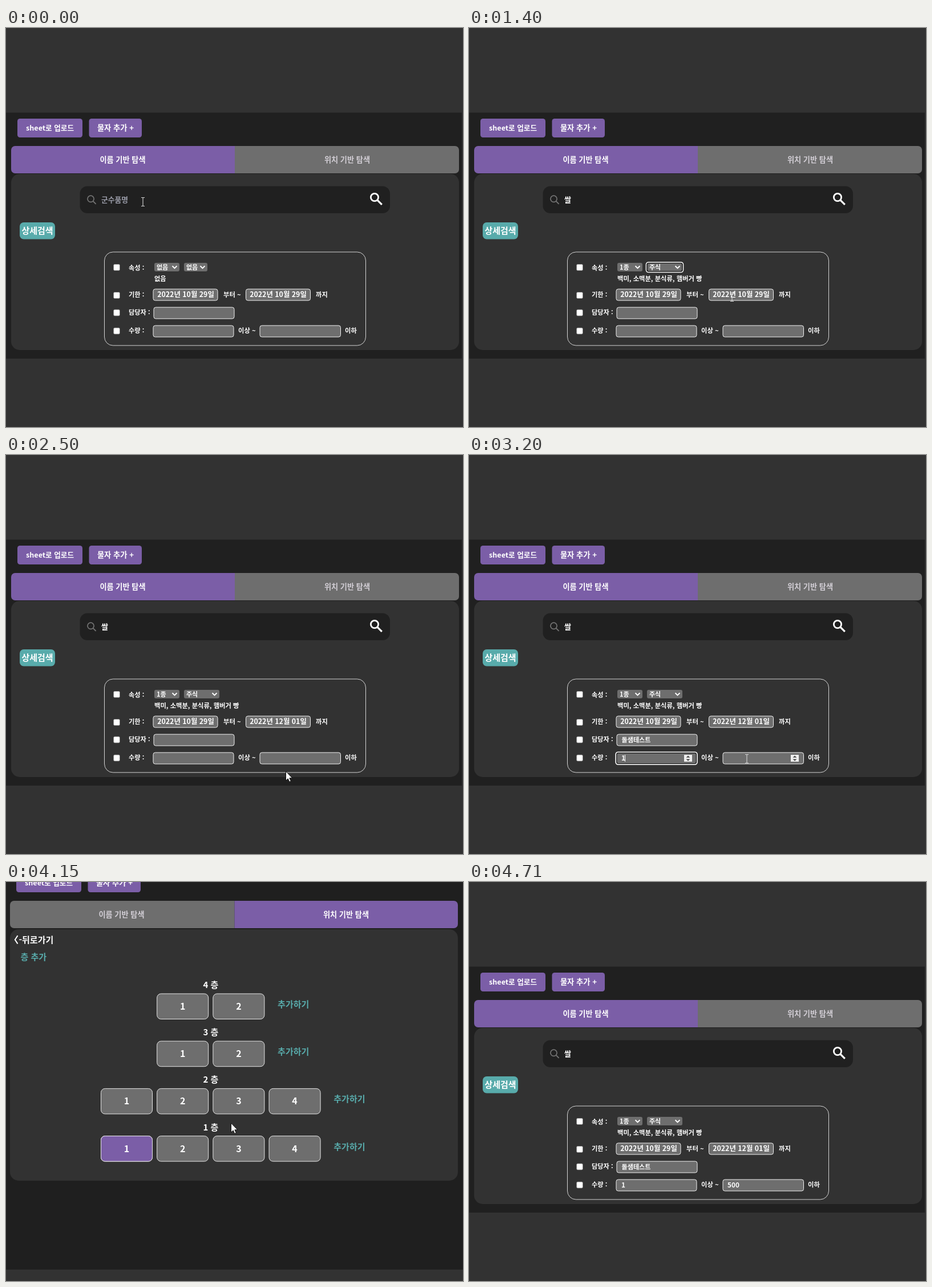
An HTML page that plays this animation: 801x700 px, repeating every 4.81 s.

```html
<!DOCTYPE html>
<html lang="ko">
<head>
<meta charset="utf-8">
<title>물자 탐색</title>
<style>
  html, body { margin: 0; width: 100%; height: 100%; overflow: hidden; background: #323232; }
  svg { display: block; width: 801px; height: 700px; }
  text { font-family: "Noto Sans CJK KR", "Noto Sans CJK", "Noto Sans", sans-serif; font-weight: 700; white-space: pre; }
</style>
</head>
<body>
<svg id="stage" viewBox="0 0 801 700"></svg>
<script>
const LOOP = 4810, MAP = 3700, LEVELS = 3900, BACK = 4710;
const PURPLE = '#7b5ea7', GRAY = '#6e6e6e', DARK = '#202020', PANEL = '#323232', TEAL = '#58abab', WHITE = '#fff';
const stage = document.getElementById('stage');
const timed = [];
let layer = stage;

function add(tag, attrs) {
  const el = document.createElementNS('http://www.w3.org/2000/svg', tag);
  for (const k in attrs) el.setAttribute(k, attrs[k]);
  layer.append(el);
  return el;
}

// Edges, not sizes: left, top, right, bottom.
const box = (l, t, r, b, fill, rx = 0, stroke = 'none', width = 1) =>
  add('rect', { x: l, y: t, width: r - l, height: b - t, rx, fill, stroke, 'stroke-width': width });

const line = (d, stroke = WHITE, width = 1.6) =>
  add('path', { d, stroke, fill: 'none', 'stroke-width': width });

function label(str, x, y, size, fill = WHITE, anchor = 'start') {
  const el = add('text', { x, y, fill, 'font-size': size, 'text-anchor': anchor });
  el.textContent = str;
  return el;
}
const centered = (str, x, y, size, fill) => label(str, x, y, size, fill, 'middle');

function group(draw) {
  const outer = layer;
  const g = layer = add('g', {});
  draw();
  layer = outer;
  return g;
}

// Draws a group visible in each [from, to) span.
function during(spans, draw) {
  timed.push({ el: group(draw), spans });
}

const chevron = (x, y) => line(`M${x - 4} ${y - 2}l4 4 4-4`, WHITE, 1.8);

function header(active) {
  box(20, 159, 134, 192, PURPLE, 4.5);
  centered('sheet로 업로드', 77, 180, 12.6);
  box(145.5, 159, 238, 192, PURPLE, 4.5);
  centered('물자 추가 +', 192, 180, 13.3);
  const split = active ? 402.5 : 401;
  const half = (l, r, on) =>
    add('path', {
      d: l < 10 ? `M${r} 207H16a7 7 0 0 0-7 7v34a7 7 0 0 0 7 7H${r}z`
                : `M${l} 207H787a7 7 0 0 1 7 7v34a7 7 0 0 1-7 7H${l}z`,
      fill: on ? PURPLE : GRAY
    });
  half(9, split, !active);
  half(split, 794, active);
  centered('이름 기반 탐색', 204.5, 235.5, 13.2, active ? '#d2ced5' : WHITE);
  centered('위치 기반 탐색', 598, 235.5, 13.2, active ? WHITE : '#d2ced5');
}

function select(str, l, r) {
  box(l, 412, r, 427, GRAY, 3);
  label(str, l + 4, 424, 11);
  chevron(r - 8.5, 419.5);
}

const field = (l, t, r, b) => box(l + .5, t + .5, r - .5, b - .5, GRAY, 3.5, '#f2f2f2');

function ring(l, t, r, b) {
  box(l, t, r, b, 'none', 4, WHITE, 1.6);
  box(l + 1.5, t + 1.5, r - 1.5, b - 1.5, 'none', 3, '#111', 1.2);
}

function spinner(x) {
  box(x, 526, x + 14, 538, '#efefef');
  add('path', { d: `M${x + 3.5} 530.8l3.5-3.3 3.5 3.3zM${x + 3.5} 533.4l3.5 3.3 3.5-3.3z`, fill: '#444' });
}

// Shows growing text: each entry replaces the one before it.
function typed(steps, x, y, size, end = LOOP) {
  steps.forEach(([at, str], i) => {
    const to = i + 1 < steps.length ? steps[i + 1][0] : end;
    during([[at, to]], () => label(str, x, y, size));
  });
}

function searchView() {
  box(0, 148.5, 799, 580, DARK);
  header(0);
  box(9, 256, 794, 565, PANEL, 15);
  box(129.5, 277.5, 673, 325, DARK, 13);
  add('circle', { cx: 148.5, cy: 299.8, r: 5.6, fill: 'none', stroke: '#747474', 'stroke-width': 1.7 });
  line('M152.6 303.8l5 5', '#747474', 1.8);
  add('circle', { cx: 646, cy: 297, r: 6.6, fill: 'none', stroke: WHITE, 'stroke-width': 2.8 });
  line('M650.6 301.6l8.2 8.2', WHITE, 3.2);

  during([[0, 200]], () => label('군수품명', 167, 306, 12.8, '#989aa6'));
  typed([[200, 'ㅆ'], [300, '싸'], [400, '쌀']], 167, 306, 13);

  box(24, 341, 86, 370.5, TEAL, 7);
  centered('상세검색', 55, 361, 15);
  box(172.5, 393, 630.5, 557, 'none', 15, '#d4d4d4');

  [['속성 :', 420, 424.5], ['기한 :', 469, 472], ['담당자 :', 499.5, 503], ['수량 :', 531.5, 534.5]].forEach(([str, mid, y]) => {
    box(188.5, mid - 5.5, 199.5, mid + 5.5, WHITE, 2, '#767676', .8);
    label(str, 215, y, 11.2);
  });

  during([[0, 900]], () => { select('없음', 260, 304); select('없음', 312, 353); });
  during([[900, LOOP]], () => select('1종', 260, 304));
  during([[900, 1200]], () => select('없음', 312, 374));
  during([[1200, LOOP]], () => select('주식', 312, 374));
  during([[1200, 1500]], () => ring(310.5, 411, 375.5, 428.5));
  during([[0, 1200]], () => label('없음', 260, 444, 11.2));
  during([[1200, LOOP]], () => label('백미, 소맥분, 분식류, 햄버거 빵', 260, 444, 11.3));

  field(257.5, 457.5, 371.5, 478.5);
  centered('2022년 10월 29일', 315, 472, 12.4);
  label('부터 ~', 381, 472, 11.3);
  field(420, 457.5, 534, 478.5);
  during([[0, 2300]], () => centered('2022년 10월 29일', 477, 472, 12.4));
  during([[2300, LOOP]], () => centered('2022년 12월 01일', 477, 472, 12.4));
  label('까지', 543, 472, 11.3);

  field(258.5, 489.5, 400.5, 510.5);
  typed([...'돌샘테스트'].map((c, i, all) => [2600 + i * 100, all.slice(0, i + 1).join('')]), 267.5, 504, 11.1);

  field(257.5, 521.5, 399.5, 542.5);
  label('이상 ~', 407, 534.5, 11.3);
  field(444.5, 521.5, 587, 542.5);
  label('이하', 594, 534.5, 11.3);
  typed([[3200, '1']], 267, 536, 11.8);
  typed([[3400, '5'], [3500, '50'], [3600, '500']], 453, 536, 11.8);
  during([[3100, 3300]], () => { ring(257.2, 521.2, 400, 543); spinner(377); });
  during([[3200, 3300]], () => line('M273.5 526v12', WHITE, 1));
  during([[3200, MAP]], () => spinner(564));
  during([[3300, MAP]], () => ring(444.2, 521.2, 587.2, 543));
}

function mapView() {
  add('path', { d: 'M7 680V98a15 15 0 0 1 15-15H777a15 15 0 0 1 15 15V680z', fill: PANEL });
  label('위치 기반 물자 관리', 22, 123.5, 17);
  box(29, 147, 118, 165.5, '#374151');
  label('돌샘 창고', 33.5, 161.5, 14.9);
  chevron(109.5, 155.5);
  box(124.5, 231.5, 674.5, 674, '#f4a460', 0, '#85664a');

  const block = (l, t, r, b, fill, ...lines) => {
    box(l, t, r, b, fill, 0, '#1b1b26', 1.3);
    lines.forEach((str, i) => centered(str, (l + r) / 2, t + 14.5 + i * 19, 13));
  };
  const RED = '#7f1d1d', BLUE = '#1e3a8a';
  block(131, 237.5, 179, 271, RED, '정문');
  block(620, 634.5, 668, 668, RED, '후문');
  block(131, 357, 233, 509, BLUE, '캐비넷1');
  block(239.5, 357, 341.5, 509, BLUE, '캐비넷2');
  block(348.5, 357, 450.5, 430, BLUE, '캐비넷3');
  block(348.5, 436, 450.5, 509, BLUE, '캐비넷4');
  block(457, 357, 505, 430, BLUE, '미니 캐', '비넷1');
  block(457, 436, 505, 509, BLUE, '미니 캐', '비넷2');
}

function levelView() {
  box(7, 83, 792, 524, PANEL, 15);
  line('M20.5 94l-4.7 7.2 4.7 7.2', WHITE, 2);
  label('-뒤로가기', 22.5, 106.5, 15);
  label('층 추가', 25.5, 137, 15, TEAL);
  const cell = (n, x, y, fill) => {
    box(x, y, x + 90, y + 44.5, fill, 7, '#e6e6e6');
    centered(n, x + 45, y + 28, 16);
  };
  [2, 2, 4, 4].forEach((count, row) => {
    const y = 196 + row * 83.2, left = count === 2 ? 264.7 : 166.5;
    centered(`${4 - row} 층`, 359, y - 10, 15);
    for (let i = 0; i < count; i++) cell(i + 1, left + i * 98.2, y, GRAY);
    label('추가하기', left + count * 98.2 + 15, y + 24, 15, TEAL);
  });
  during([[4050, BACK]], () => cell(1, 166.5, 445.6, PURPLE));
}

during([[0, MAP], [BACK, LOOP]], searchView);
during([[MAP, BACK]], () => {
  box(0, 0, 801, 680, '#1f1f1f');
  group(() => header(1)).setAttribute('transform', 'translate(-2 -174)');
  during([[MAP, LEVELS]], mapView);
  during([[LEVELS, BACK]], levelView);
});

const pointer = group(() => {
  during([[0, 600], [1400, 2400], [2600, MAP]], () => {
    line('M-3-7.5h2.2L0-6.7.8-7.5H3M0-6.7V6.7M-3 7.5h2.2L0 6.7l.8.8H3', '#d6d6d6', 1.1);
  });
  during([[600, 1400], [2400, 2600], [MAP, BACK]], () => {
    add('path', { d: 'M.5 0v16.2l3.7-3.4 2.5 5.6 2.7-1.2-2.5-5.4h5z', fill: WHITE, stroke: '#111', 'stroke-width': 1 });
  });
});

// Time, x, y of the pointer.
const path = [
  [0, 240, 305], [500, 240, 305], [700, 285, 420], [900, 285, 420], [1000, 345, 420], [1200, 345, 420],
  [1400, 461, 472], [2300, 461, 472], [2500, 490, 555], [2600, 330, 500], [3000, 330, 500],
  [3100, 330, 532], [3200, 487, 533], [3699, 487, 533],
  [3700, 190, 414], [3900, 190, 414], [4000, 211, 467], [4050, 211, 467], [4150, 394, 423], [LOOP, 394, 423]
];

function pointerAt(t) {
  const i = path.findIndex(p => p[0] > t);
  const [t0, x0, y0] = path[i - 1], [t1, x1, y1] = path[i];
  const k = (t - t0) / (t1 - t0);
  return [x0 + (x1 - x0) * k, y0 + (y1 - y0) * k];
}

function render() {
  const now = performance.now() % LOOP;
  const step = now < MAP ? 100 : 50;
  const t = Math.floor(now / step) * step;
  for (const { el, spans } of timed) {
    const on = spans.some(([from, to]) => now >= from && now < to);
    el.setAttribute('display', on ? 'inline' : 'none');
  }
  pointer.setAttribute('transform', `translate(${pointerAt(t)})`);
  requestAnimationFrame(render);
}
render();
</script>
</body>
</html>
```
